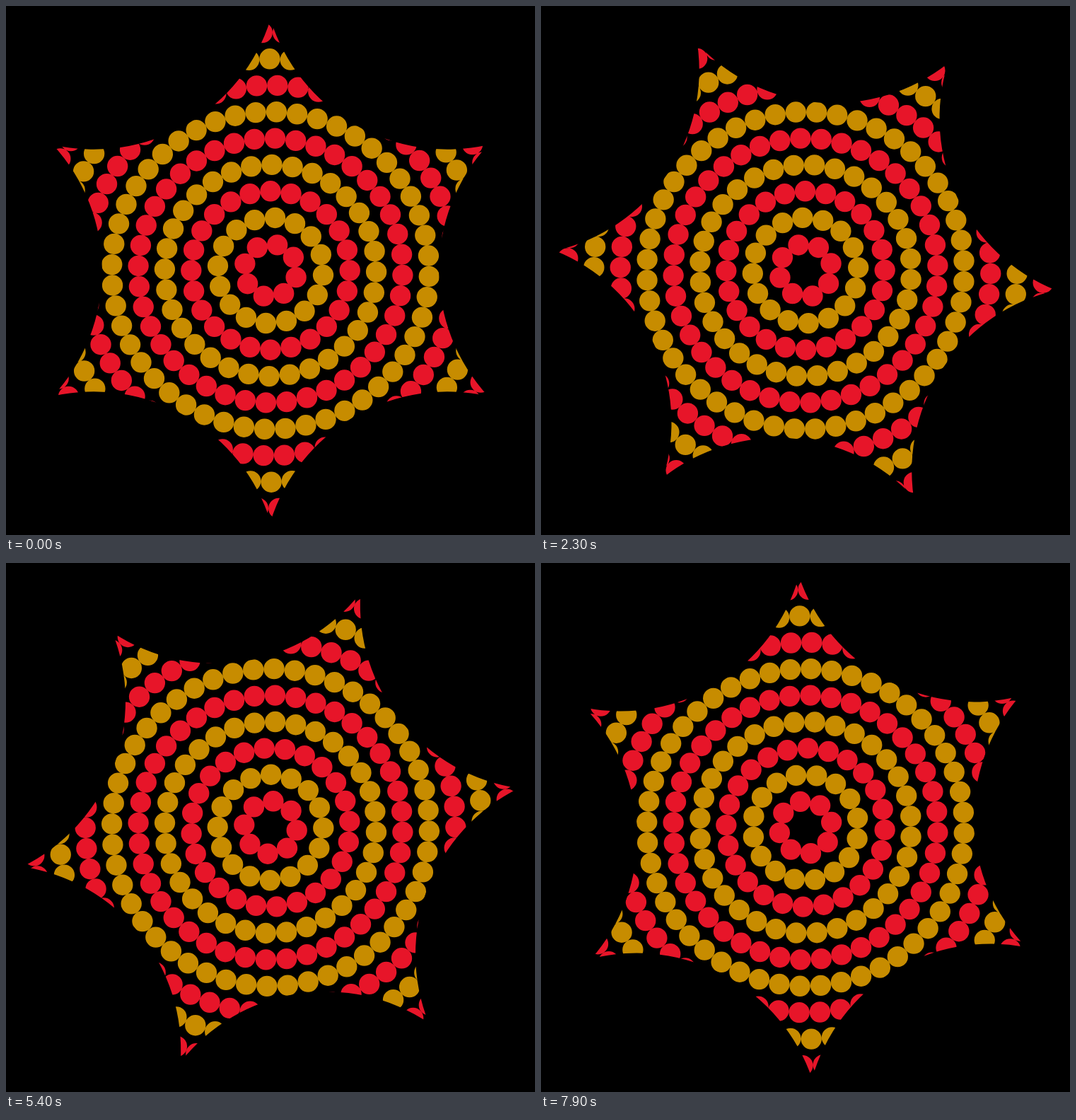
These frames come from a looping animation (748 by 748 pixels, 8 s). An HTML page with a canvas:

```html
<!DOCTYPE html>
<html lang="en">
<head>
<meta charset="utf-8">
<title>Dotted rings in a turning star</title>
<style>
  html, body { margin: 0; width: 100%; height: 100%; overflow: hidden; background: #000; }
  canvas { display: block; }
</style>
</head>
<body>
<canvas id="stage" width="748" height="748"></canvas>
<script>
const ctx = document.getElementById('stage').getContext('2d');
const SIZE = 748, HALF = SIZE / 2;
const STEP = 100, STEPS = 80;
const RINGS = 9, GAP = SIZE / 20;
const DOT = GAP * Math.PI / 8;
const RED = '#e71529', GOLD = '#c78c00';
const TAU = Math.PI * 2;
const rad = deg => deg * Math.PI / 180;

// Star: six concave arcs that meet at the tips
const TIP = HALF * 0.95, BITE = HALF * 0.7;
const SIDE = TIP * Math.cos(rad(30));
const REACH = Math.sqrt(BITE ** 2 - (TIP / 2) ** 2);
const SPREAD = Math.atan2(TIP / 2, REACH);

function starPath(turn) {
  ctx.beginPath();
  for (let k = 0; k < 6; k++) {
    const a = turn + k * TAU / 6;
    const d = SIDE + REACH;
    ctx.arc(d * Math.cos(a), d * Math.sin(a), BITE,
      a + Math.PI + SPREAD, a + Math.PI - SPREAD, true);
  }
  ctx.closePath();
}

function drawRing(n, turn, color) {
  const count = 8 * n, r = GAP * n;
  ctx.fillStyle = color;
  ctx.beginPath();
  for (let i = 0; i < count; i++) {
    const a = turn + i * TAU / count;
    const x = r * Math.cos(a), y = r * Math.sin(a);
    ctx.moveTo(x + DOT, y);
    ctx.arc(x, y, DOT, 0, TAU);
  }
  ctx.fill();
}

function draw(step) {
  ctx.setTransform(1, 0, 0, 1, 0, 0);
  ctx.fillStyle = '#000';
  ctx.fillRect(0, 0, SIZE, SIZE);
  ctx.translate(HALF, HALF);
  ctx.save();
  starPath(rad(1.5 * step));
  ctx.clip();
  // Odd and even rings turn opposite ways, slower further out
  const phase = step - 240;
  for (let n = 1; n <= RINGS; n++) {
    const odd = n % 2 === 1;
    drawRing(n, rad((odd ? 13 : -4) * phase / (n + 1)), odd ? RED : GOLD);
  }
  ctx.restore();
}

const start = performance.now();
function tick() {
  const t = Math.max(0, performance.now() - start);
  draw(Math.floor(t / STEP) % STEPS);
  requestAnimationFrame(tick);
}
tick();
</script>
</body>
</html>
```
